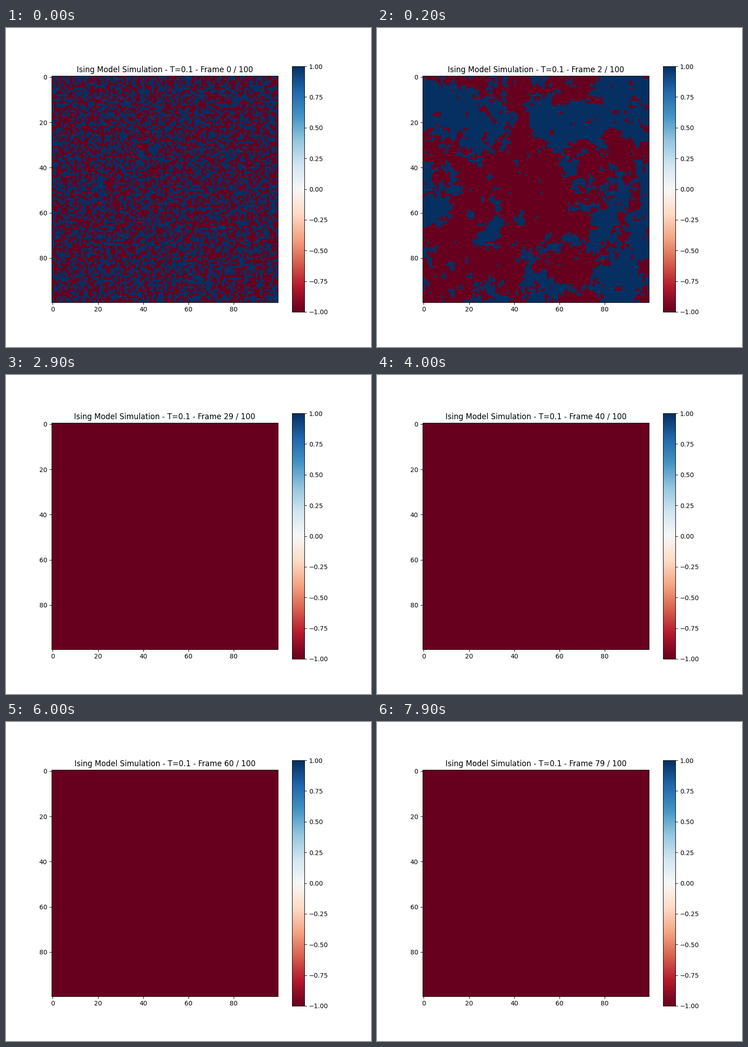
Write a matplotlib script that moves like this. It is 800 by 700 pixels and loops after 8000 ms.

```python
import numpy as np
import matplotlib.pyplot as plt
from matplotlib.animation import FuncAnimation

SIZE = 100
FRAMES = 80
TOTAL = 100
TEMP = 0.1
BOND = 1 - np.exp(-2 / TEMP)  # chance that equal neighbours are linked


def neighbours(i, j):
    yield (i - 1) % SIZE, j
    yield (i + 1) % SIZE, j
    yield i, (j - 1) % SIZE
    yield i, (j + 1) % SIZE


def find_clusters(spins, rng):
    """Group linked sites of equal spin on the periodic lattice."""
    grid = spins.tolist()
    seen = np.zeros((SIZE, SIZE), bool).tolist()
    clusters = []
    for start in np.ndindex(SIZE, SIZE):
        if seen[start[0]][start[1]]:
            continue
        seen[start[0]][start[1]] = True
        cluster = [start]
        for i, j in cluster:  # grows while it is walked
            for y, x in neighbours(i, j):
                if (not seen[y][x] and grid[y][x] == grid[i][j]
                        and rng.random() < BOND):
                    seen[y][x] = True
                    cluster.append((y, x))
        clusters.append(cluster)
    return clusters


def step(spins, rng):
    """Give each cluster a random spin; the largest one points down."""
    new = np.empty_like(spins)
    clusters = find_clusters(spins, rng)
    for cluster in clusters:
        new[tuple(np.transpose(cluster))] = rng.choice([-1, 1])
    new[tuple(np.transpose(max(clusters, key=len)))] = -1
    return new


def simulate():
    rng = np.random.default_rng(42)
    states = [rng.choice([-1, 1], size=(SIZE, SIZE))]
    while abs(states[-1].sum()) < SIZE * SIZE:
        states.append(step(states[-1], rng))
    return states


states = simulate()

fig, ax = plt.subplots(figsize=(8, 7), dpi=100)
image = ax.imshow(states[0], cmap="RdBu", vmin=-1, vmax=1)
fig.colorbar(image, ax=ax)
title = ax.set_title("")


def update(n):
    image.set_data(states[min(n, len(states) - 1)])
    title.set_text(f"Ising Model Simulation - T={TEMP} - Frame {n} / {TOTAL}")
    return image, title


anim = FuncAnimation(fig, update, frames=FRAMES, interval=100,
                     repeat=True, repeat_delay=0, blit=False)
plt.show()
```
